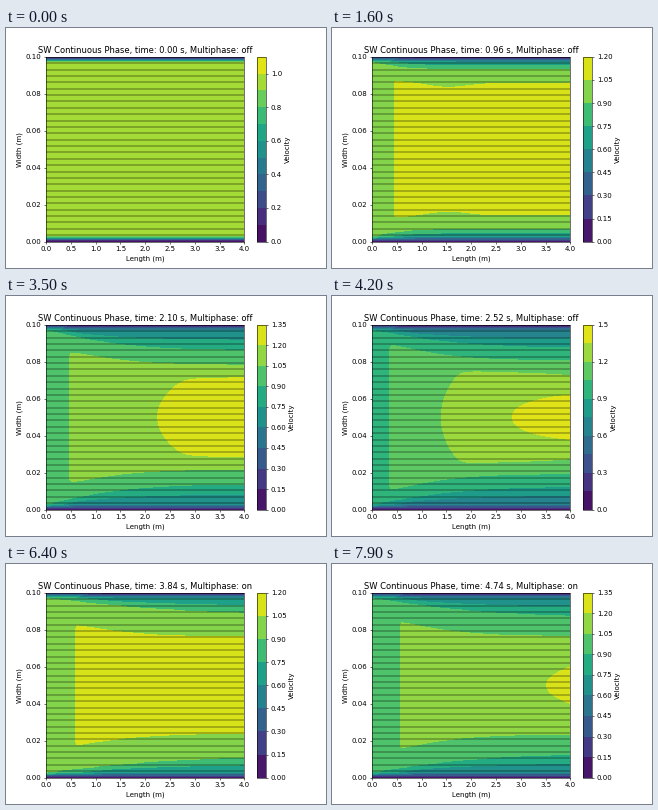
These frames come from a looping animation (320x240 px, 8000 ms). A matplotlib script:

```python
import numpy as np
import matplotlib.pyplot as plt
from matplotlib.animation import FuncAnimation

LENGTH, HEIGHT = 4.0, 0.1
FRAMES, DT = 80, 0.06
SUBLAYER = 0.0028

x = np.linspace(0, LENGTH, 161)
y = np.linspace(0, HEIGHT, 141)
depth = np.minimum(y, HEIGHT - y)
radius = np.abs(y - HEIGHT / 2)
lines = np.linspace(0, HEIGHT, 30)[1:-1]

# t, core start, exit speed, exponent, layer growth, layer length,
# core edge at start, core edge at exit, edge bump
KEYS = np.array([
    [0.00, 0.10, 0.985, 0.5, 0.0000, 0.7, 0.0040, 0.0040, 0.0],
    [0.06, 0.10, 1.010, 0.5, 0.0004, 0.7, 0.0050, 0.0050, 0.0],
    [0.54, 0.35, 1.090, 0.5, 0.0025, 0.7, 0.0110, 0.0115, 0.001],
    [0.96, 0.45, 1.150, 0.4, 0.0040, 0.7, 0.0130, 0.0145, 0.0025],
    [1.56, 0.75, 1.195, 0.5, 0.0127, 1.3, 0.0195, 0.0260, 0.0],
    [2.16, 0.45, 1.300, 0.7, 0.0110, 1.8, 0.0140, 0.0215, 0.0],
    [2.52, 0.36, 1.460, 0.8, 0.0100, 2.0, 0.0105, 0.0195, 0.0],
    [2.94, 0.60, 1.380, 0.7, 0.0100, 2.8, 0.0150, 0.0215, 0.0],
    [3.18, 1.02, 1.170, 0.5, 0.0095, 4.0, 0.0200, 0.0258, 0.0],
    [3.84, 0.60, 1.190, 0.4, 0.0093, 3.0, 0.0175, 0.0240, 0.0],
    [4.74, 0.58, 1.207, 0.3, 0.0105, 2.5, 0.0160, 0.0237, 0.0],
])

# first frame, top level, level step
SCALES = [(0, 1.1, 0.1), (11, 1.2, 0.15), (17, 1.35, 0.15), (38, 1.5, 0.15),
          (50, 1.35, 0.15), (52, 1.2, 0.15), (75, 1.35, 0.15)]


def velocity(t):
    start, exit_speed, power, growth, reach, edge0, edge1, bump = (
        np.interp(t, KEYS[:, 0], col) for col in KEYS[:, 1:].T)

    # speed along the centre line
    knee = min(1.05, exit_speed)
    frac = np.clip((x - start) / (LENGTH - start), 0, 1)
    centre = np.where(x < start, 0.98 + (knee - 0.98) * x / start,
                      knee + (exit_speed - knee) * frac ** power)
    curve = 7370 * np.maximum(centre - 1.1, 0) ** 2
    core = centre - curve * (radius[:, None] ** 2
                             / (1 + (radius[:, None] / 0.024) ** 2))

    # boundary layer growing downstream
    inner = SUBLAYER + growth * np.tanh(x / reach)
    outer = (edge0 + (edge1 - edge0) * np.tanh(np.maximum(x - start, 0) / 1.4)
             + bump * np.exp(-((x - 1.5) / 0.6) ** 2))
    outer = np.maximum(outer, inner + 0.0008)
    low = 0.9 - 0.3 * np.minimum((inner - SUBLAYER) / 0.004, 1)
    wall = np.empty_like(core)
    for i, (a, b, v) in enumerate(zip(inner, outer, low)):
        wall[:, i] = np.interp(depth, [0, SUBLAYER, a + 1e-6, b, b + 0.0325],
                               [0, v, 0.9, 1.05, 1.8])
    return wall * (1 + (wall / core) ** 60) ** (-1 / 60)


fig = plt.figure(figsize=(6.4, 4.8), dpi=50)


def draw(i):
    t = i * DT
    _, top, step = [s for s in SCALES if s[0] <= i][-1]
    levels = np.arange(round(top / step) + 1) * step

    fig.clear()
    ax = fig.add_subplot()
    filled = ax.contourf(x, y, np.clip(velocity(t), 0, top - 1e-3),
                         levels=levels, cmap="viridis")
    fig.colorbar(filled, ax=ax, label="Velocity")
    ax.hlines(lines, 0, LENGTH, color="k", linewidth=0.7)
    ax.set(xlim=(0, LENGTH), ylim=(0, HEIGHT),
           xlabel="Length (m)", ylabel="Width (m)")
    state = "on" if t > 2.99 else "off"
    ax.set_title(f"SW Continuous Phase, time: {t:.2f} s, Multiphase: {state}")
    return []


anim = FuncAnimation(fig, draw, frames=FRAMES, interval=100,
                     init_func=lambda: [], repeat=True, repeat_delay=0)
plt.show()
```
